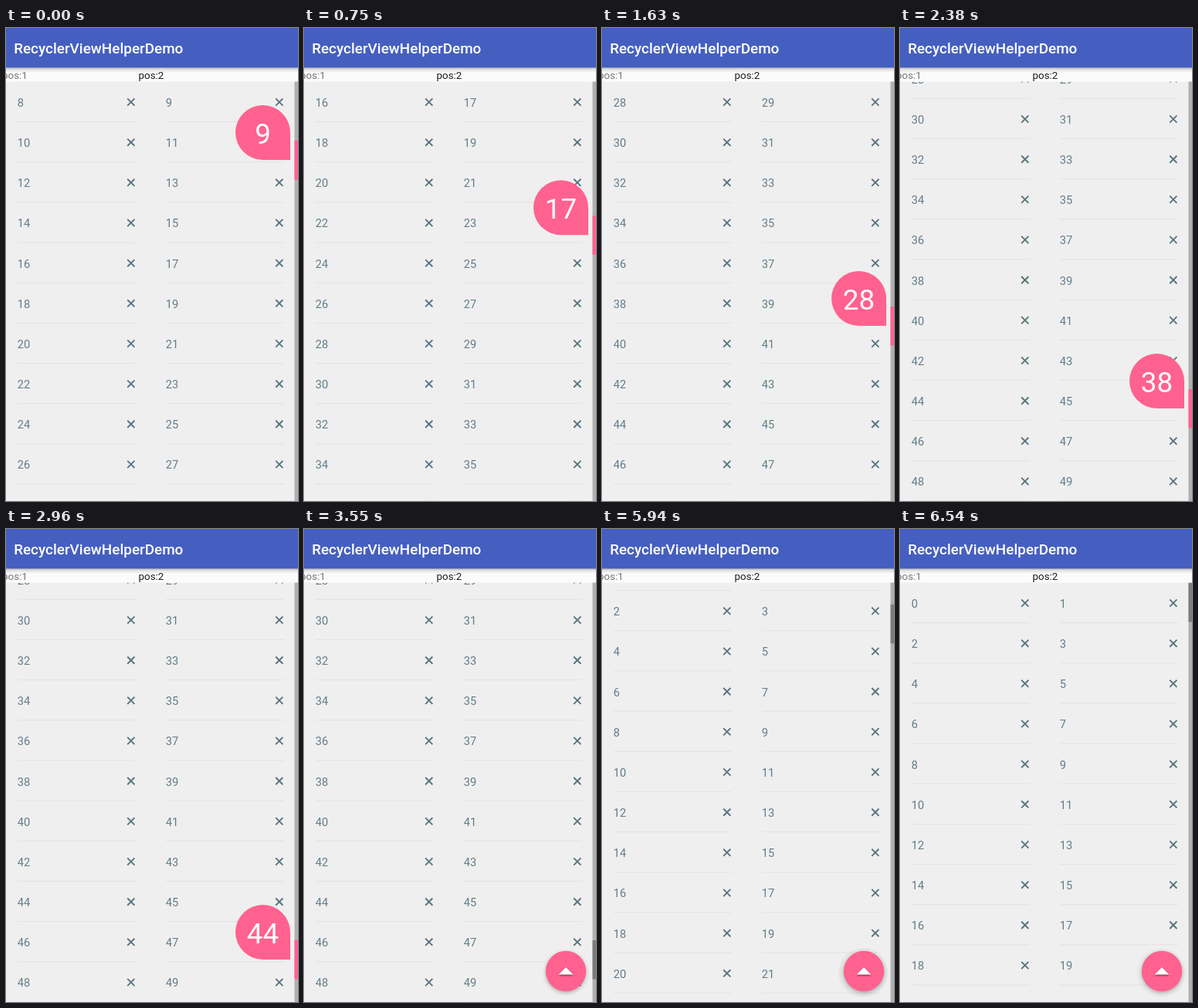
An HTML page for the animation above (9230 ms loop, 378 px wide and 613 px high).

```html
<!DOCTYPE html>
<html lang="en">
<head>
<meta charset="utf-8">
<title>Fast scroller</title>
<style>
html, body { margin: 0; width: 100%; height: 100%; overflow: hidden; background: #efefef; }
svg { display: block; font-family: Roboto, "Noto Sans", sans-serif; }
.title { font-size: 18.9px; font-weight: 500; fill: #fff; }
.tab { font-size: 13.4px; }
.cell { font-size: 14.7px; fill: #627d8a; }
.cross { stroke: #587480; stroke-width: 1.9; fill: none; }
.line { fill: #e2e2e2; }
.count { font-size: 36.75px; fill: #fff; text-anchor: middle; }
.lift { filter: drop-shadow(0 2px 2.5px rgba(0, 0, 0, .28)); }
.arrow { filter: drop-shadow(0 1px 1px rgba(0, 0, 0, .6)); }
</style>
</head>
<body>
<svg width="378" height="613" viewBox="0 0 378 613">
  <defs>
    <clipPath id="view"><rect y="69.5" width="378" height="543.5"/></clipPath>
    <linearGradient id="shade" x2="0" y2="1">
      <stop offset="0" stop-color="#000" stop-opacity=".3"/>
      <stop offset=".4" stop-color="#000" stop-opacity=".1"/>
      <stop offset="1" stop-color="#000" stop-opacity="0"/>
    </linearGradient>
  </defs>
  <rect width="378" height="613" fill="#efefef"/>
  <g clip-path="url(#view)"><g id="list"></g></g>
  <rect y="51" width="378" height="18.5" fill="#fbfbfb"/>
  <text class="tab" x="-5" y="66" fill="#777">pos:1</text>
  <text class="tab" x="171.5" y="66" fill="#1c1c1c">pos:2</text>
  <rect y="51" width="378" height="7" fill="url(#shade)"/>
  <rect width="378" height="51.3" fill="#455fc0"/>
  <text class="title" x="10.2" y="33">RecyclerViewHelperDemo</text>
  <rect x="373.5" y="69.5" width="4.5" height="543.5" fill="#b0b0b0"/>
  <rect id="thumb" x="373.5" width="4.5" height="50.5"/>
  <g id="bubble">
    <path d="M332.5 -46A35.5 35.5 0 0 0 332.5 25H368V-10.5A35.5 35.5 0 0 0 332.5 -46Z" fill="#ff628f"/>
    <text id="count" class="count" x="332.5" y="4"></text>
  </g>
  <g id="fab">
    <circle id="halo" cx="338" cy="575" r="32" fill="#000"/>
    <circle id="disc" class="lift" cx="339" cy="573" r="26.2"/>
    <path class="arrow" d="M329.5 577.5L339 568L348.5 577.5Z" fill="#fff"/>
  </g>
</svg>
<script>
const LOOP = 9230, ROW = 52.17, TOP = 69.5, ITEMS = 50, VIEW = 543.5;
const MAX = 760.6;
const RELEASE = 3000, TAP = 5220, GLIDE = 1646;
const BURSTS = [[150, 1190], [1340, 2380], [2530, 3550], [5350, 6390]];
const DRAG = [[0, 146], [750, 244], [1630, 360], [2380, 468], [2900, 533]];
const HALO = [[5350, .055], [5700, .05], [6390, .014]];

const $ = id => document.getElementById(id);
const [list, thumb, bubble, count, fab, halo, disc] =
  ['list', 'thumb', 'bubble', 'count', 'fab', 'halo', 'disc'].map($);
const clamp = v => Math.max(0, Math.min(1, v));

function mix(keys, t) {
  let value = keys[0][1];
  for (let i = 1; i < keys.length; i++) {
    const [a, from] = keys[i - 1], [b, to] = keys[i];
    if (t >= a) value = from + (to - from) * clamp((t - a) / (b - a));
  }
  return value;
}

// The screen refreshes in eight even steps per burst and rests in between.
function hold(t) {
  if (t >= 6540) return 6540;
  let last = 0;
  for (const [a, b] of BURSTS) {
    if (t < a) break;
    const step = (b - a) / 7;
    last = a + Math.min(7, Math.floor((t - a) / step + .08)) * step;
  }
  return last;
}

list.innerHTML = Array.from({ length: ITEMS }, (_, i) => `
  <g transform="translate(${i % 2 * 192} ${TOP + (i >> 1) * ROW})">
    <text class="cell" x="14.7" y="32.4">${i}</text>
    <path class="cross" d="M157.2 21.9l9.2 9.2m0 -9.2l-9.2 9.2"/>
    <rect class="line" x="15" y="51.5" width="153" height="1"/>
  </g>`).join('');

function draw(time) {
  const t = hold(time);
  const dragging = t < RELEASE;
  let y = mix(DRAG, t);
  const item = Math.floor((y + 25 - TOP) * (ITEMS - 1) / VIEW);
  let scroll = Math.min(MAX, (item >> 1) * ROW);

  if (t > TAP) {
    scroll = MAX * Math.pow(1 - clamp((t - TAP) / GLIDE), 5);
    if (t >= 6540) scroll = 0;
    y = Math.min(533, 70 + scroll * .665);
  }

  list.setAttribute('transform', `translate(0 ${-scroll})`);
  thumb.setAttribute('y', y);
  thumb.setAttribute('fill', dragging ? '#ff628f' : '#7c7c7c');

  bubble.setAttribute('transform', `translate(0 ${y})`);
  bubble.setAttribute('opacity', 1 - clamp((t - RELEASE) / 300));
  count.textContent = item;

  const grow = clamp((t - 3300) / 220);
  fab.setAttribute('opacity', grow);
  fab.setAttribute('transform', `translate(339 573) scale(${grow}) translate(-339 -573)`);
  halo.setAttribute('opacity', t > TAP ? mix(HALO, t) : 0);
  disc.setAttribute('fill', t > TAP && t < 5600 ? '#fa5c88' : '#ff628f');
}

const start = performance.now();
function tick() {
  draw((performance.now() - start) % LOOP);
  requestAnimationFrame(tick);
}
tick();
</script>
</body>
</html>
```
